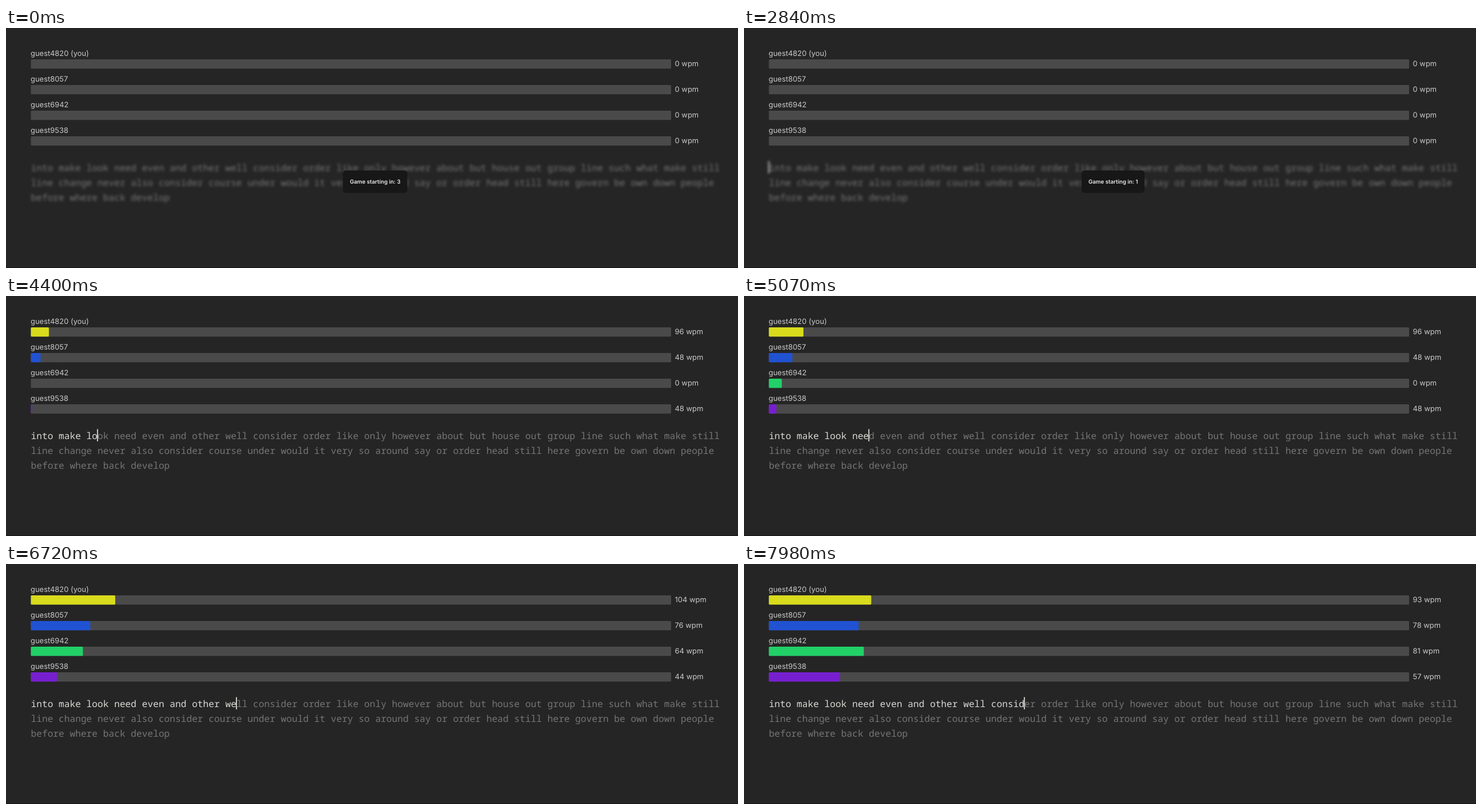
Write an HTML page that moves like this. It is 1280x421 px and loops after 8 s.

```html
<!DOCTYPE html>
<html lang="en">
<head>
<meta charset="utf-8">
<title>Typing race</title>
<style>
  html, body { margin: 0; width: 100%; height: 100%; overflow: hidden; background: #252525; }
  svg { display: block; width: 100%; height: 100%; }
  text { white-space: pre; text-rendering: geometricPrecision; }
  .label { font: 400 12.95px Inter, sans-serif; fill: #cacaca; }
  .words { font: 400 16.19px "Noto Sans Mono", monospace; fill: #757575; }
  .typed { fill: #d8d8d4; }
  .toast { font: 600 9.7px Inter, sans-serif; fill: #ececec; text-anchor: middle; }
</style>
</head>
<body>
<svg id="stage" viewBox="0 0 1280 421">
  <defs>
    <filter id="blur" filterUnits="userSpaceOnUse" x="0" y="215" width="1280" height="110">
      <feGaussianBlur stdDeviation="2"/>
    </filter>
  </defs>
  <rect width="1280" height="421" fill="#252525"/>
  <rect y="420" width="1280" height="1" fill="#151515"/>
</svg>
<script>
const LOOP = 8000, LEFT = 43.5, TRACK = 1119.5, CHAR = 9.714;
const START = 3360;

const LINES = [
  'into make look need even and other well consider order like only however about but house out group line such what make still',
  'line change never also consider course under would it very so around say or order head still here govern be own down people',
  'before where back develop'
];

// Progress points are [time, width]; wpm is listed per update in TICKS.
const TICKS = [4340, 5400, 6520, 7440];
const RACERS = [
  { name: 'guest4820 (you)', color: '#d9db1d', wpm: [96, 96, 104, 93],
    path: [[3780, 0], [3920, 6], [4400, 31.5], [5720, 88.5], [6720, 147.5], [7980, 179]] },
  { name: 'guest8057', color: '#2152d2', wpm: [48, 66, 76, 78],
    path: [[4130, 0], [4400, 17], [5720, 64.5], [6720, 104], [7980, 157]] },
  { name: 'guest6942', color: '#22d068', wpm: [0, 48, 64, 81],
    path: [[4400, 0], [5720, 44.5], [6720, 91], [7980, 166]] },
  { name: 'guest9538', color: '#771fd0', wpm: [48, 30, 44, 57],
    path: [[4330, 0], [4400, 2], [5720, 24], [6720, 45.5], [7980, 124.5]] }
];
const TYPING = [[START, 0], [3920, 7], [4400, 12], [5720, 25], [5920, 29], [6720, 37], [7980, 46]];
const BLINKS = [730, 1320, 1780, 2380, 2840];
const TOAST_WIDTH = { 3: 112.5, 2: 112, 1: 110 };

const steps = (from, to, n) => Array.from({ length: n }, (_, i) => from + (to - from) * i / (n - 1));
const UPDATES = [
  0, ...BLINKS, ...steps(START, 4130, 12), ...steps(4200, 4400, 4), ...steps(4470, 4940, 5),
  ...steps(5070, 5720, 6), 5920, 6120, 6320, 6520, 6720, 6980, 7180, 7440, ...steps(7700, 7980, 5)
];

const countPast = (list, t) => list.filter(x => x <= t).length;

function along(points, t) {
  if (t <= points[0][0]) return points[0][1];
  for (let i = 1; i < points.length; i++) {
    const [t0, v0] = points[i - 1], [t1, v1] = points[i];
    if (t <= t1) return v0 + (v1 - v0) * (t - t0) / (t1 - t0);
  }
  return points[points.length - 1][1];
}

function add(parent, tag, attrs, text) {
  const el = document.createElementNS('http://www.w3.org/2000/svg', tag);
  for (const key in attrs) el.setAttribute(key, attrs[key]);
  if (text) el.textContent = text;
  return parent.appendChild(el);
}

const stage = document.getElementById('stage');

RACERS.forEach((racer, i) => {
  const y = 55 + 45 * i;
  const bar = { x: LEFT, y, height: 16.3, rx: 1.5 };
  add(stage, 'text', { class: 'label', x: 43, y: y - 5.8 }, racer.name);
  add(stage, 'rect', { ...bar, width: TRACK, fill: '#4a4a4a' });
  racer.fill = add(stage, 'rect', { ...bar, width: 0, fill: racer.color });
  racer.speed = add(stage, 'text', { class: 'label', x: 1169.5, y: y + 12.3 });
});

const passage = add(stage, 'g', { class: 'words' });
const rows = LINES.map((line, i) =>
  add(passage, 'text', { x: LEFT, y: 250.6 + 26 * i }, i ? line : ''));
const typed = add(rows[0], 'tspan', { class: 'typed' });
const rest = add(rows[0], 'tspan', {});
const caret = add(passage, 'rect', { y: 233.5, width: 1.6, height: 21.5, fill: '#f0f0ea' });

const toast = add(stage, 'g', {});
const toastBox = add(toast, 'rect', { y: 250, height: 39.3, rx: 5, fill: '#171717' });
const toastText = add(toast, 'text', { class: 'toast', x: 645.5, y: 273.3 });

function draw(time) {
  const t = UPDATES[countPast(UPDATES, time) - 1];
  const waiting = t < START;
  const ticks = countPast(TICKS, t);

  for (const racer of RACERS) {
    racer.fill.setAttribute('width', along(racer.path, t));
    racer.speed.textContent = (ticks ? racer.wpm[ticks - 1] : 0) + ' wpm';
  }

  const n = Math.floor(along(TYPING, t) + 1e-6);
  typed.textContent = LINES[0].slice(0, n);
  rest.textContent = LINES[0].slice(n);
  caret.setAttribute('x', LEFT + n * CHAR - 0.8);
  caret.style.display = !waiting || countPast(BLINKS, t) % 2 ? '' : 'none';

  if (waiting) passage.setAttribute('filter', 'url(#blur)');
  else passage.removeAttribute('filter');

  toast.style.display = waiting ? '' : 'none';
  const left = 3 - countPast([1320, 2380], t);
  const width = TOAST_WIDTH[left];
  toastBox.setAttribute('x', 645.4 - width / 2);
  toastBox.setAttribute('width', width);
  toastText.textContent = 'Game starting in: ' + left;
}

const begin = performance.now();
function frame() {
  draw((performance.now() - begin) % LOOP);
  requestAnimationFrame(frame);
}
frame();
</script>
</body>
</html>
```
